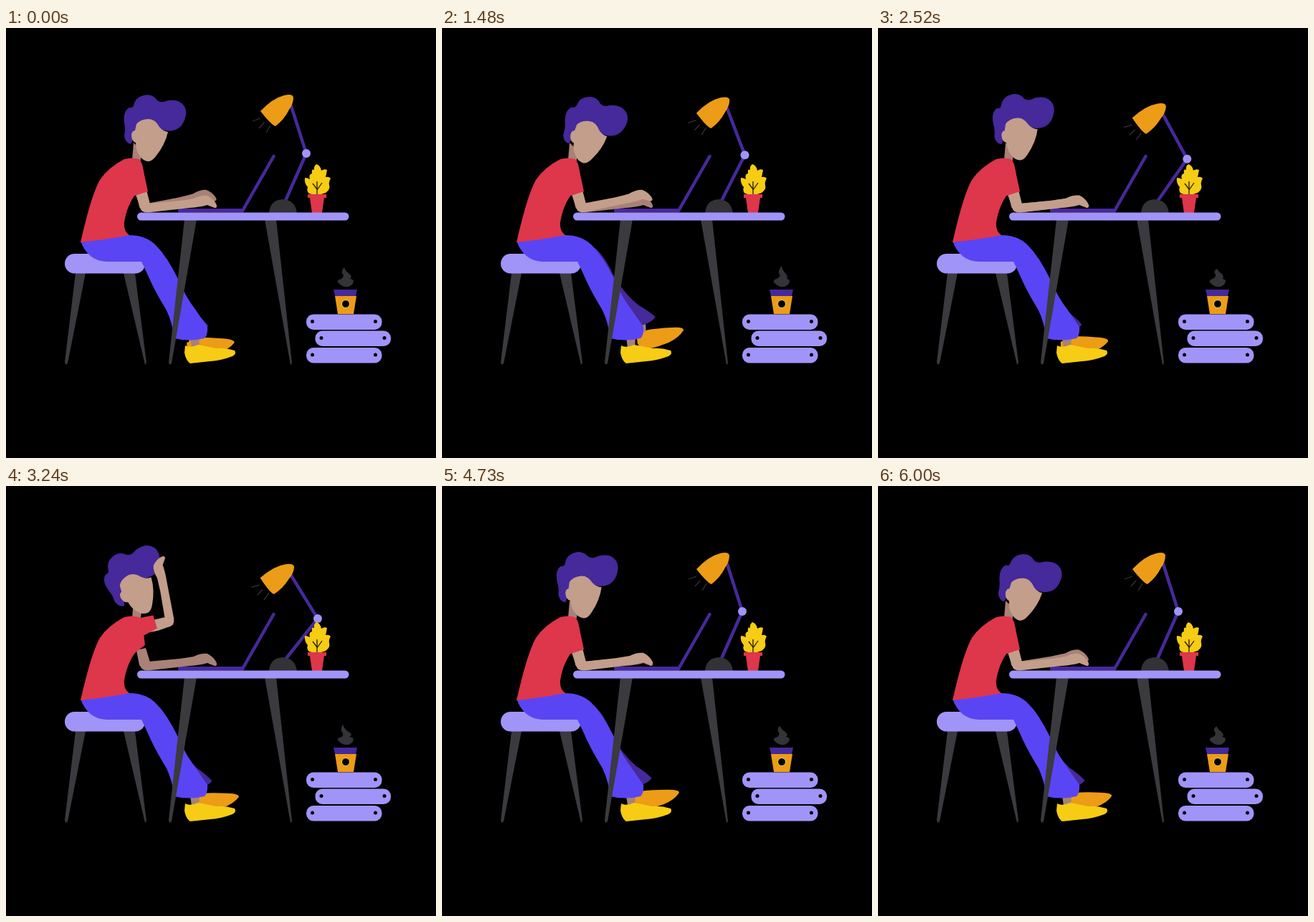
These frames come from a looping animation (600 px wide and 600 px high, 6030 ms). An HTML page:

```html
<!DOCTYPE html>
<html lang="en">
<head>
<meta charset="utf-8">
<title>Working at a desk</title>
<style>
html, body { margin: 0; width: 100%; height: 100%; overflow: hidden; background: #000; }
svg { display: block; width: 100%; height: 100%; }
.violet { fill: #46299a; }
.lilac { fill: #a194f8; }
.blue { fill: #5a45f4; }
.red { fill: #de364b; }
.skin { fill: #c39e8b; }
.shade { fill: #a88177; }
.orange { fill: #ec9c16; }
.yellow { fill: #f6cc14; }
.dark { fill: #3a3a3f; }
.rod { fill: none; stroke: #46299a; stroke-width: 4.5; stroke-linecap: round; }
</style>
</head>
<body>
<svg viewBox="0 0 600 600">
  <defs>
    <path id="forearm" d="M187 250Q190 244 198 245L242 241L262 238Q272 233 281 234Q289 238 293 245Q296 251 291 251L281 247Q270 250 256 251L202 257Q189 259 187 250Z"/>
  </defs>

  <!-- far leg -->
  <g id="farLeg">
    <path class="shade" d="M273 405L289 410L290 422L280 427Z"/>
    <path class="orange" d="M277 428Q284 424 291 418Q304 415 325 413Q343 411 342 416Q337 426 322 434Q309 440 295 444Q283 444 279 438Z"/>
    <path class="violet" d="M200 300Q222 306 240 342Q256 368 278 384Q292 391 302 399Q299 406 284 412Q268 406 255 383L225 335Z"/>
  </g>

  <!-- stool and near leg -->
  <path class="dark" d="M97 342H111L86 468L83 470L82 466ZM164 342H180L196 467L194 470Z"/>
  <rect class="lilac" x="82" y="315" width="112" height="27.5" rx="13.5"/>
  <path class="shade" d="M257 432H270L269 446H259Z"/>
  <path class="yellow" d="M250 443Q257 447 268 442Q280 444 293 447Q306 446 319 450Q322 455 316 458Q300 464 285 465L257 468Q251 464 249 453Z"/>
  <path class="blue" d="M104 297Q140 292 168 289Q193 288 208 302Q225 319 240 350Q250 374 263 391L281 417Q282 428 277 433Q255 438 235 433Q232 411 224 394Q210 371 202 354Q194 336 189 326H140Q114 325 104 297Z"/>

  <!-- table and laptop -->
  <path class="dark" d="M249 267H266L231 468L228 470L227 466ZM361 267H377L399 468L397 470Z"/>
  <rect class="violet" x="240" y="252" width="92" height="5.5" rx="2"/>
  <path class="rod" d="M373.500 179L330 255"/>

  <!-- lamp -->
  <path class="rod" id="arm"/>
  <path d="M367 259Q368 240 386 239Q404 240 406 259Z" fill="#323237"/>
  <g id="shade">
    <path class="orange" d="M355 116Q372 98 388 94Q400 91 401 97Q401 106 395 114Q388 128 376 137Q370 135 355 116Z"/>
    <path d="M344 130L355 126M353 140L360 132M363 146L369 136" stroke="#343434" stroke-width="1.300"/>
  </g>
  <circle class="lilac" id="joint" r="6"/>

  <g id="plant">
    <path class="yellow" d="M433 190Q439 192 440 199Q444 196 448 198Q447 204 446 208Q451 207 453 210Q450 215 451 219Q453 225 446 230Q434 235 423 231Q419 228 421 222Q416 217 417 209Q421 209 424 211Q422 204 427 203Q426 196 430 198Q429 193 433 190Z"/>
    <path d="M434 232V214M434 225L428 217M434 226L441 216" fill="none" stroke="#241c00" stroke-width="1.300"/>
    <path class="red" d="M421 232H447V237H444L441 258H427L424 237H421Z"/>
  </g>
  <rect class="lilac" x="183" y="257.500" width="295.500" height="11" rx="5.500"/>

  <!-- books and coffee -->
  <g id="books"></g>
  <path class="orange" d="M459 374H489L485 399H463Z"/>
  <path class="violet" d="M457 365H490L488 374H459Z"/>
  <circle cx="474" cy="385" r="5.500" stroke="#f6d27a"/>
  <path id="steam" fill="#333338"/>

  <!-- upper body -->
  <path class="shade" d="M182 229L195 226L201 246L192 256L186 250Z"/>
  <use href="#forearm" class="shade" id="backArm"/>
  <path class="shade" d="M178 160L190 172L187 188L176 184Z"/>
  <path class="red" d="M186 183Q176 180 165 183Q142 195 131 212Q119 233 104 299Q142 295 172 289Q164 284 165 271Q167 258 172 247Q177 236 181 232L194 222L190 190Z"/>
  <g id="head">
    <path class="violet" d="M174 162Q166 160 165 150Q167 143 165 132Q163 116 172 111Q177 112 178 108Q181 96 192 94Q204 91 211 101Q215 104 220 103Q230 99 240 102Q253 108 251 122Q248 137 237 142Q226 146 216 141L180 150Z"/>
    <path class="skin" d="M182 134Q188 127 199 127Q208 127 214 138Q219 144 226 145Q222 163 209 179Q203 187 197 186Q189 184 185 176Q181 169 181 160Q175 158 175 149Q176 143 180 143Z"/>
  </g>
  <g id="upperArm" class="skin"><path d="M179 222L194 218L201 246Q198 256 191 256Q187 252 181 232Z"/></g>
  <use href="#forearm" class="skin" id="frontArm"/>
  <path class="red" id="sleeve" d="M166 190Q175 181 186 184Q191 190 193 205L198 228L180 234L170 216Z"/>
</svg>
<script>
const LOOP = 6030, TYPE = 592;
const el = id => document.getElementById(id);
const set = (id, value, name = 'transform') => el(id).setAttribute(name, value);
const turn = (a, x, y) => `rotate(${a} ${x} ${y})`;

el('books').innerHTML = [[419, 399.500], [431.500, 422.500], [419, 446]].map(([x, y]) =>
  `<rect class="lilac" x="${x}" y="${y}" width="105.500" height="21.500" rx="10"/>` +
  [8.500, 96.500].map(d => `<circle cx="${x + d}" cy="${y + 10}" r="2.500"/>`).join('')).join('');

// Smooth curve through [time, value] points, flat at peaks and ends.
function curve(t, keys) {
  const n = keys.length - 1;
  if (t <= keys[0][0]) return keys[0][1];
  if (t >= keys[n][0]) return keys[n][1];
  const i = keys.findIndex(k => k[0] > t) - 1;
  const slope = j => (keys[j + 1][1] - keys[j][1]) / (keys[j + 1][0] - keys[j][0]);
  const tangent = j => {
    if (j < 1 || j >= n) return 0;
    const a = slope(j - 1), b = slope(j);
    return a * b > 0 ? 2 * a * b / (a + b) : 0;
  };
  const [t0, v0] = keys[i], [t1, v1] = keys[i + 1], h = t1 - t0, s = (t - t0) / h, r = 1 - s;
  return v0 * r * r * (1 + 2 * s) + v1 * s * s * (3 - 2 * s) +
    h * s * r * (tangent(i) * r - tangent(i + 1) * s);
}

const HEAD = [[0, 0], [700, 5], [1480, 7.400], [2000, 3], [2520, -4.800], [3150, -28.500],
  [3740, -29], [4030, -15], [4390, -10], [4730, -5], [6000, 5]];
const FOOT = [[0, 0], [1250, 0.950], [1480, 0.770], [2520, 0.100], [2790, 0], [3240, 0.250],
  [4030, 1], [4730, 0.500], [5400, 0], [6000, 0.300]];
const LAMP = [[800, 0], [1480, 0.220], [2520, 0.770], [3300, 1], [4030, 0.610], [4730, 0]];
const RAISE = [[2540, 0], [3150, 1], [3700, 1], [4030, 0.180], [4200, 0]];
const BEND = [[2540, 0], [3150, 1], [3700, 1], [4030, 0.030], [4200, 0]];
const PUSH = [[3400, 0], [4030, 2.500], [4600, 0]];
const REST = [[2520, 1], [2650, 0], [4030, 0], [4250, 1]];

function draw(t) {
  set('head', turn(curve(t, HEAD), 180, 182));
  set('farLeg', turn(11 * (1 - curve(t, FOOT)), 208, 305));

  const u = curve(t, LAMP), jx = 419 + 16 * u, jy = 175 + 10 * u;
  set('arm', `M389 243L${jx} ${jy}L398 ${109 + 16 * u}`, 'd');
  set('joint', `translate(${jx} ${jy})`);
  set('shade', `translate(0 ${16 * u}) ${turn(5 * u, 398, 110)}`);
  set('plant', `translate(${curve(t, PUSH)} 0)`);

  // hands tap alternately except while one scratches the head
  const phase = t < 3500 ? (t - 1480) / TYPE + 0.250 : (t - 6000) / TYPE + 0.620;
  const tap = 5.500 * Math.sin(2 * Math.PI * phase) * curve(t, REST);
  const raise = curve(t, RAISE), bend = curve(t, BEND);
  const swing = -89 * raise, a = swing * Math.PI / 180;
  const ex = 180 + 14 * Math.cos(a) - 47 * Math.sin(a);
  const ey = 203 + 14 * Math.sin(a) + 47 * Math.cos(a);
  const lift = -3 * Math.min(1, 6 * raise) * (1 - bend) - 94 * bend - Math.max(0, tap);
  set('upperArm', turn(swing, 180, 203));
  set('sleeve', `translate(0 ${-5 * raise}) ${turn(swing, 180, 203)}`);
  set('frontArm', `translate(${ex} ${ey}) rotate(${lift}) scale(${1 - 0.080 * bend} 1) translate(-194 -250)`);
  set('backArm', turn(Math.min(0, tap), 194, 250));

  const w = Math.sin(t / 190), tip = 472 + 2 * w, top = 334 + 2 * Math.sin(t / 310);
  set('steam', `M${tip} ${top}Q${tip + 1} 339 ${479 + w} 343Q${484 - w} 347 ${480 + w} 350` +
    `Q488 351 483 358Q474 366 463 355Q462 351 ${468 - w} 350Q${473 + w} 346 ${469 + w} 342` +
    `Q${468 + w} 338 ${tip} ${top}Z`, 'd');
}

const start = performance.now();
function frame() {
  draw((performance.now() - start) % LOOP);
  requestAnimationFrame(frame);
}
frame();
</script>
</body>
</html>
```
